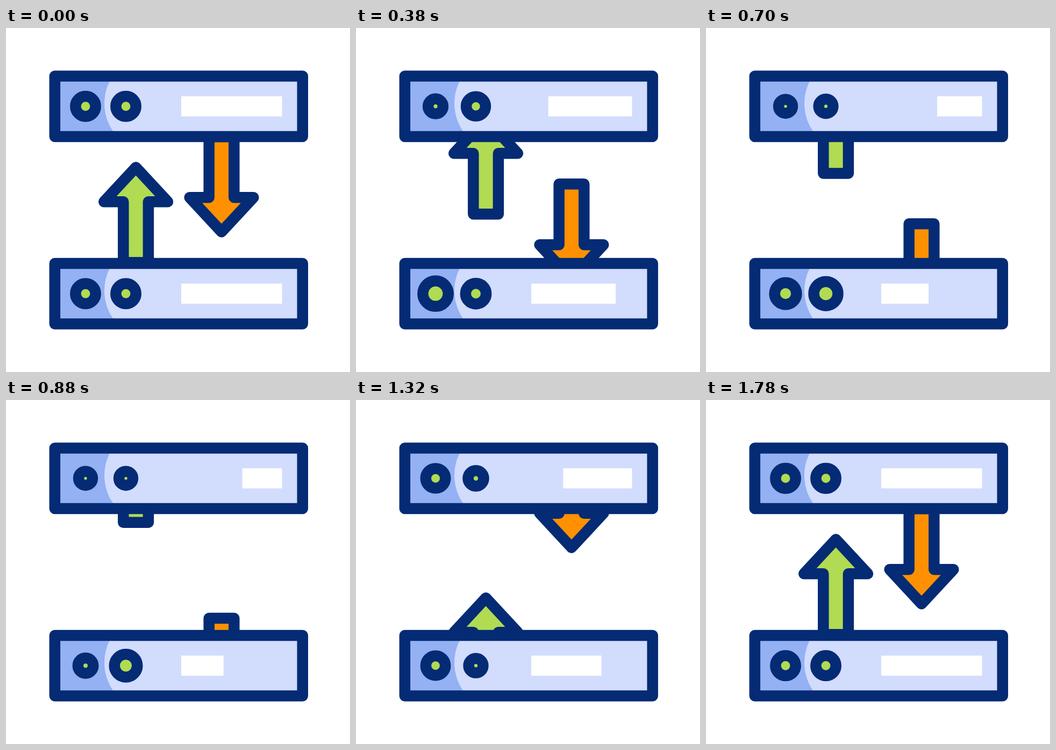
An HTML page that plays this animation: 640x640 px, repeating every 1820 ms.

```html
<!DOCTYPE html>
<html lang="en">
<head>
<meta charset="utf-8">
<title>Server transfer</title>
<style>
  html, body { margin: 0; width: 100%; height: 100%; overflow: hidden; background: #fff; }
  svg { display: block; width: 100%; height: 100%; }
  .line { stroke: #042b74; stroke-width: 20.5; stroke-linejoin: round; }
</style>
</head>
<body>
<svg viewBox="0 0 640 640">
  <defs>
    <clipPath id="gap"><rect x="100" y="150" width="440" height="340"/></clipPath>
    <path id="arrow" class="line" d="M0 0L59.4 64H23.3V177H-23.3V64H-59.4Z"/>
    <g id="server">
      <rect x="90.8" y="89.6" width="461" height="112.4" fill="#d2dcfd"/>
      <path d="M95 99.5H192.5A92 92 0 0 0 199 192H95Z" fill="#93b1f3"/>
      <rect class="line" x="90.8" y="89.6" width="461" height="112.4" fill="none"/>
    </g>
  </defs>
  <g id="arrows" clip-path="url(#gap)"></g>
  <g id="servers"></g>
</svg>
<script>
const LOOP = 1820, END = 1780, STEP = 20;
const ROW = 348.5;
const REST = 18.7, SMALL = 12.95;
const BAR_LEFT = 326, BAR_RIGHT = 513.5, BAR = BAR_RIGHT - BAR_LEFT;

function add(parent, tag, attrs) {
  const node = document.createElementNS("http://www.w3.org/2000/svg", tag);
  for (const key in attrs) node.setAttribute(key, attrs[key]);
  return parent.appendChild(node);
}

// Ease with horizontal handles at x1 and x2.
function ease(u, x1 = 1 / 3, x2 = 2 / 3) {
  let low = 0, high = 1;
  for (let i = 0; i < 24; i++) {
    const s = (low + high) / 2, r = 1 - s;
    if (3 * x1 * s * r * r + 3 * x2 * s * s * r + s ** 3 < u) low = s;
    else high = s;
  }
  return low * low * (3 - 2 * low);
}

// Keys are [time, value, x1, x2]; the handles shape the way to the next key.
function track(keys, t) {
  if (t <= keys[0][0]) return keys[0][1];
  for (let i = 1; i < keys.length; i++) {
    const [t0, v0, x1, x2] = keys[i - 1], [t1, v1] = keys[i];
    if (t <= t1) return v0 + (v1 - v0) * ease((t - t0) / (t1 - t0), x1, x2);
  }
  return keys[keys.length - 1][1];
}

const barKeys = shrink => [[0, 0, 0.595, 0.453], [920, shrink, 0.514, 0.418], [END, 0]];

const rows = [
  {
    bar: barKeys(114),
    dials: [
      [[0, REST], [510, SMALL], [980, SMALL], [1387, REST]],
      [[270, REST], [780, SMALL], [1180, SMALL], [1587, REST]]
    ]
  },
  {
    bar: barKeys(109),
    dials: [
      [[0, REST], [510, 24.6], [975, SMALL], [1030, SMALL], [1387, REST]],
      [[270, REST], [780, 22.75], [1183, SMALL], [1265, SMALL], [1580, REST]]
    ]
  }
];

const servers = document.getElementById("servers");
rows.forEach((row, i) => {
  const group = add(servers, "g", { transform: `translate(0 ${i * ROW})` });
  add(group, "use", { href: "#server" });
  row.barNode = add(group, "rect", { y: 127, height: 37.5, fill: "#fff" });
  row.dialNodes = [148, 223].map(cx =>
    add(group, "circle", { class: "line", cx, cy: 145.7, fill: "#b1db52" }));
});

// Each arrow leaves its place while a second copy comes in behind it.
const arrows = [
  { x: 241.6, y: 259.3, turn: 0, fill: "#b1db52", out: -0.237, back: -0.237 },
  { x: 401, y: 379.3, turn: 180, fill: "#ff9100", out: 0.2314, back: 0.2275 }
];
const arrowLayer = document.getElementById("arrows");
for (const arrow of arrows) {
  arrow.nodes = [0, 1].map(() => add(arrowLayer, "use", { href: "#arrow", fill: arrow.fill }));
}

function draw(t) {
  for (const { x, y, turn, out, back, nodes } of arrows) {
    [out * t, back * (t - END)].forEach((dy, i) =>
      nodes[i].setAttribute("transform", `translate(${x} ${y + dy}) rotate(${turn})`));
  }
  rows.forEach((row, i) => {
    const shrink = track(row.bar, t);
    row.barNode.setAttribute("x", i ? BAR_LEFT : BAR_LEFT + shrink);
    row.barNode.setAttribute("width", BAR - shrink);
    row.dialNodes.forEach((dial, j) => dial.setAttribute("r", track(row.dials[j], t)));
  });
}

let start;
function tick(now) {
  start ??= now;
  const t = (now - start) % LOOP;
  draw(Math.min(END, Math.floor(t / STEP) * STEP));
  requestAnimationFrame(tick);
}
draw(0);
requestAnimationFrame(tick);
</script>
</body>
</html>
```
